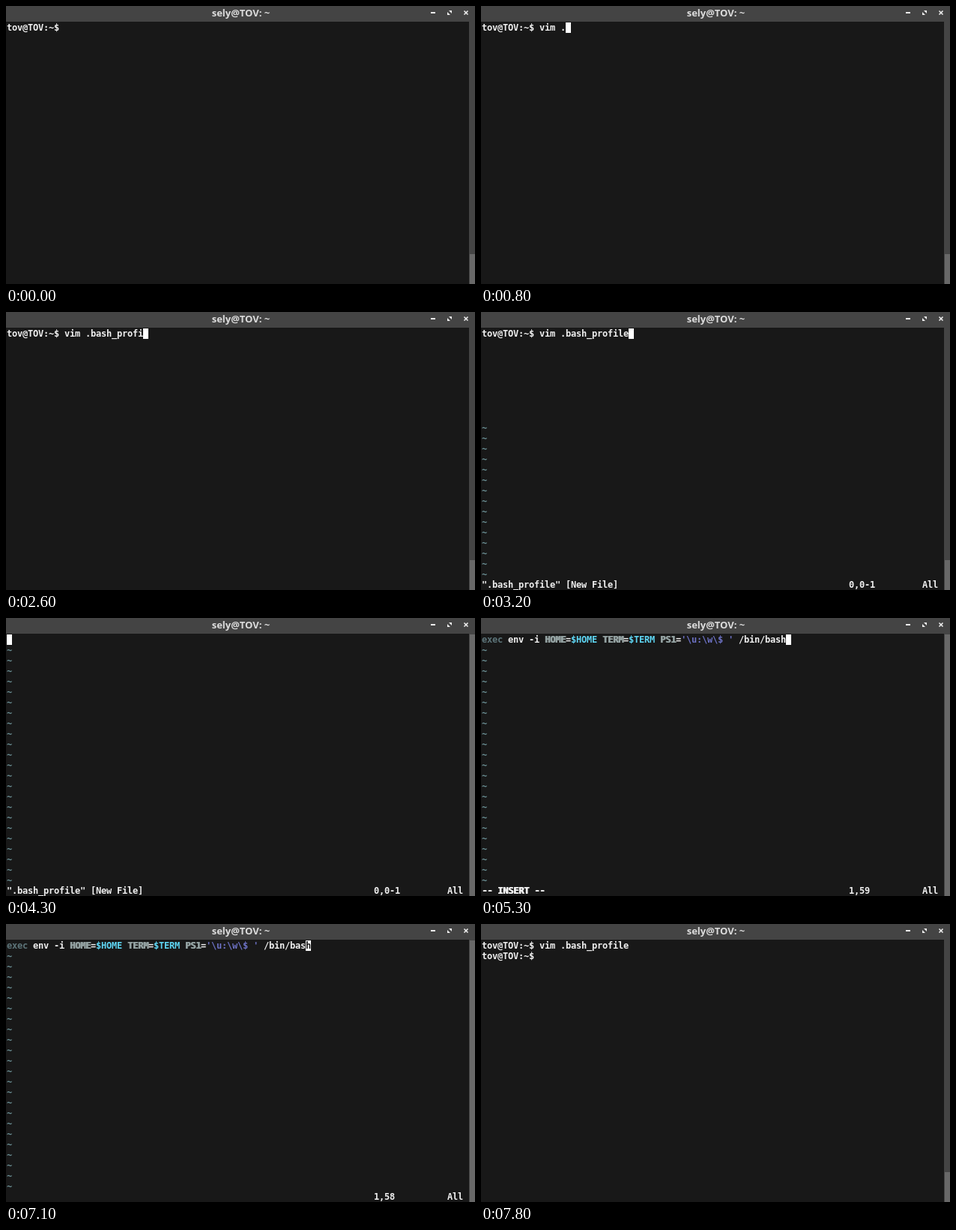
Animation of 626 by 372 pixels, one loop 8000 ms. Source, as an HTML page:

```html
<!DOCTYPE html>
<html lang="en">
<head>
<meta charset="utf-8">
<title>Terminal</title>
<style>
  html, body { margin: 0; width: 100%; height: 100%; overflow: hidden; background: #181818; }
  svg { display: block; }
  #screen text { font: bold 12px "DejaVu Sans Mono", monospace; white-space: pre; }
  #title { font: 600 13px "Noto Sans", "Open Sans", sans-serif; }
</style>
</head>
<body>
<svg width="626" height="372" viewBox="0 0 626 372">
  <rect width="626" height="372" fill="#181818"/>
  <rect width="626" height="21" fill="#444"/>
  <text id="title" x="313.5" y="14" text-anchor="middle" fill="#dcdcdc">sely@TOV: ~</text>
  <rect x="567" y="8" width="6" height="2" fill="#eee"/>
  <path d="M591 6h4v4zM589 8v4h4z" fill="#eee"/>
  <path d="M611.5 6.5l5 5m0-5l-5 5" stroke="#eee" stroke-width="1.6"/>
  <rect x="618" y="21" width="8" height="351" fill="#444"/>
  <rect id="thumb" x="619" width="7" fill="#686868"/>
  <g id="screen"></g>
</svg>
<script>
const NS = "http://www.w3.org/2000/svg";
const LOOP = 8000, CELL_W = 7, CELL_H = 14, LEFT = 1, TOP = 22, STATUS = 24;
const C = { fg: "#f0f0f0", bg: "#181818", tilde: "#6a8f94", keyword: "#5d757a",
            name: "#93a1a1", variable: "#5fd7f5", string: "#6c71c4", cursor: "#fff" };
const PROMPT = "tov@TOV:~$ ", COMMAND = "vim .bash_profile";

// [time, characters typed so far]
const TYPED = [[0, 0], [300, 1], [400, 2], [500, 3], [600, 4], [800, 5], [1100, 6], [1200, 7],
  [1300, 9], [1600, 10], [1900, 11], [2000, 12], [2200, 13], [2500, 14], [2600, 15], [2900, 16], [3000, 17]];

// [text, colour, double-struck]
const LINE = [["exec", C.keyword], [" env -i ", C.fg],
  ["HOME", C.name, true], ["=", C.fg], ["$HOME", C.variable], [" ", C.fg],
  ["TERM", C.name, true], ["=", C.fg], ["$TERM", C.variable], [" ", C.fg],
  ["PS1", C.name, true], ["=", C.fg], ["'\\u:\\w\\$ '", C.string], [" /bin/bash", C.fg]];

const screen = document.getElementById("screen");
const thumb = document.getElementById("thumb");

function add(tag, attrs, text = "") {
  const el = document.createElementNS(NS, tag);
  for (const k in attrs) el.setAttribute(k, attrs[k]);
  el.textContent = text;
  screen.appendChild(el);
}

// Each character sits in its own cell of the terminal grid.
function write(col, row, text, fill = C.fg, heavy = false) {
  for (let dx = 0; dx <= (heavy ? 1 : 0); dx++) {
    const x = [...text].map((_, i) => LEFT + dx + (col + i) * CELL_W).join(" ");
    add("text", { x, y: TOP + row * CELL_H + 11, fill }, text);
  }
}

function cursor(col, row, under = "") {
  add("rect", { x: LEFT + col * CELL_W, y: TOP + row * CELL_H, width: CELL_W, height: CELL_H, fill: C.cursor });
  if (under) write(col, row, under, C.bg);
}

function setThumb(top) {
  thumb.setAttribute("y", top);
  thumb.setAttribute("height", 372 - top);
}

function tildes(first) {
  for (let row = first; row < STATUS; row++) write(0, row, "~", C.tilde);
}

function ruler(pos) {
  write(70, STATUS, pos);
  write(84, STATUS, "All");
}

function fileMessage() {
  write(0, STATUS, '".bash_profile" [New File]');
  ruler("0,0-1");
}

function shell(t) {
  const count = TYPED.filter(([at]) => at <= t).pop()[1];
  write(0, 0, PROMPT + COMMAND.slice(0, count));
  if (count) cursor(PROMPT.length + count, 0);
}

function editor(t) {
  tildes(1);
  if (t < 4900) fileMessage();
  else if (t < 6100) {
    write(0, STATUS, "-- INSERT --", C.fg, true);
    ruler(t < 5300 ? "0,1" : "1,59");
  } else if (t >= 7100) ruler("1,58");

  if (t < 5300) {
    if (t < 3800 || t >= 4300) cursor(0, 0);
    return;
  }
  let col = 0;
  for (const [text, fill, heavy] of LINE) {
    write(col, 0, text, fill, heavy);
    col += text.length;
  }
  if (t < 5700) cursor(col, 0);
  else if (t >= 6100) cursor(col - 1, 0, "h");
}

function render(t) {
  screen.textContent = "";
  setThumb(t >= 3300 && t < 7200 ? 22 : 332);
  if (t < 3300) {
    shell(t);
    if (t >= 3200) {
      tildes(9);
      fileMessage();
    }
  } else if (t < 7200) editor(t);
  else {
    write(0, 0, PROMPT + COMMAND);
    write(0, 1, PROMPT);
    if (t < 7800) cursor(PROMPT.length, 1);
  }
}

// Every change falls on a tenth of a second.
let shown = -1;
function tick(now) {
  const step = Math.floor((now % LOOP) / 100);
  if (step !== shown) render((shown = step) * 100);
  requestAnimationFrame(tick);
}
render(0);
requestAnimationFrame(tick);
</script>
</body>
</html>
```
